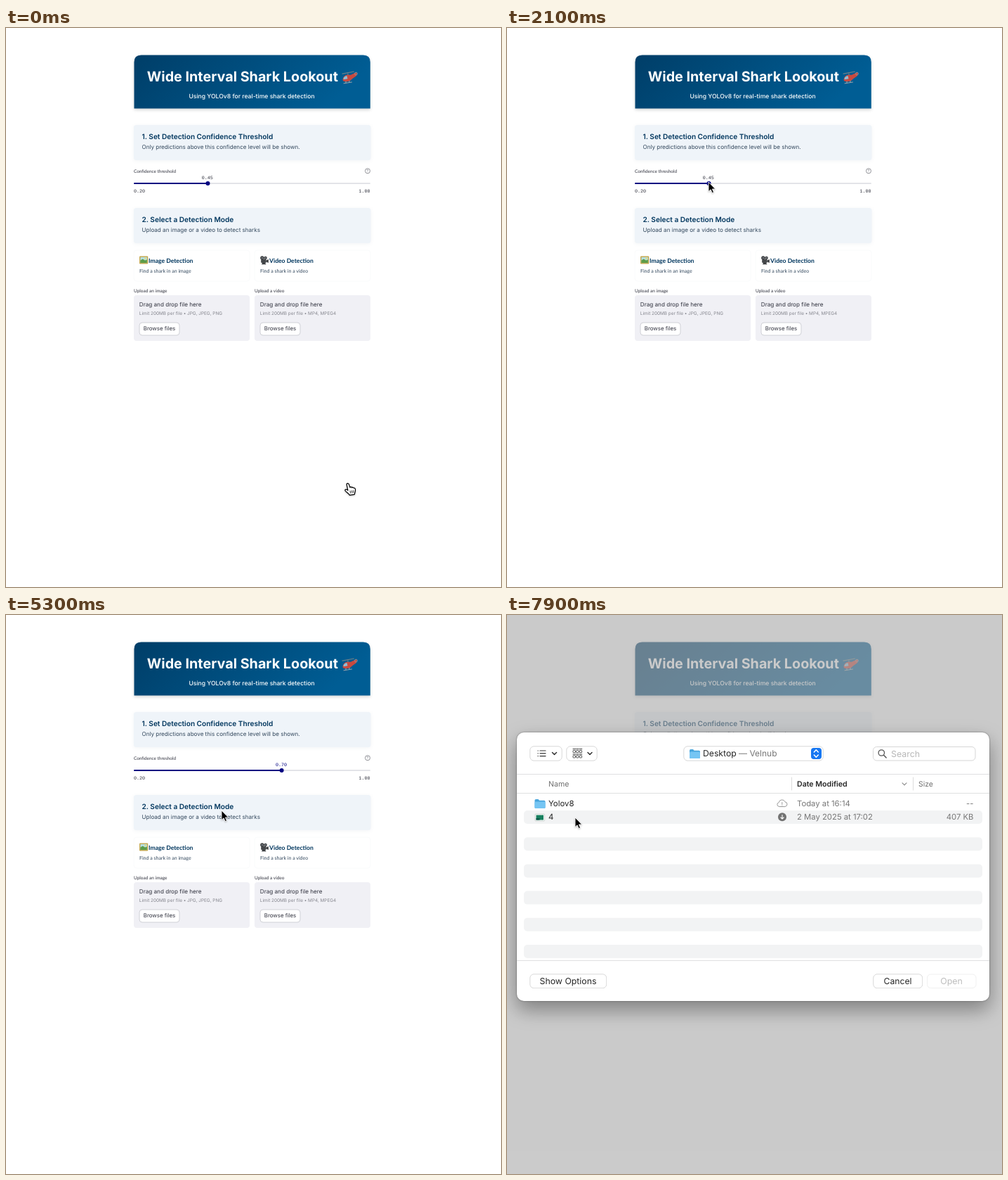
Animation, 705 px wide and 795 px high, one loop 8000 ms. Source, as an HTML page:

```html
<!DOCTYPE html>
<html lang="en">
<head>
<meta charset="utf-8">
<title>Shark detection demo</title>
<style>
html, body { margin: 0; width: 100%; height: 100%; overflow: hidden; background: #fff; }
svg { display: block; width: 705px; height: 795px; }
text { font-family: Inter, sans-serif; text-rendering: geometricPrecision; white-space: pre; }
.lato { font-family: Lato, sans-serif; }
.mono { font-family: "Liberation Mono", monospace; }
.header { filter: drop-shadow(0 2px 2px rgba(0,0,0,.16)); }
.card { filter: drop-shadow(0 1px 2.5px rgba(0,40,80,.05)); }
.panel { filter: drop-shadow(0 12px 14px rgba(0,0,0,.27)) drop-shadow(0 0 1px rgba(0,0,0,.45)); }
.key { filter: drop-shadow(0 .6px .6px rgba(0,0,0,.28)); }
.pointer { filter: drop-shadow(0 1px 1px rgba(0,0,0,.25)); }
</style>
</head>
<body>
<svg id="stage" viewBox="0 0 705 795" xmlns="http://www.w3.org/2000/svg">
  <defs>
    <linearGradient id="sea" x1="0" y1="0" x2="1" y2=".25">
      <stop offset="0" stop-color="#003e68"/><stop offset="1" stop-color="#005d94"/>
    </linearGradient>
    <g id="folder">
      <path d="M0 1.6Q0 0 1.6 0H5l1.6 1.7H13.4Q15 1.7 15 3.2V11.4Q15 13 13.4 13H1.6Q0 13 0 11.4Z" fill="#48a5dc"/>
      <rect y="3.4" width="15" height="9.6" rx="1.5" fill="#75c5f3"/>
    </g>
  </defs>
  <g id="page"></g>
  <g id="dialog"></g>
  <g id="pointer" class="pointer">
    <path id="arrow" d="M0 0V13.6L3.1 10.8 5.2 15.6 7.5 14.6 5.4 10H9.7Z" fill="#000" stroke="#fff" stroke-width=".9" stroke-linejoin="round"/>
    <g id="hand" fill="#fff" stroke="#000" stroke-width="1.2" stroke-linejoin="round" stroke-linecap="round">
      <path d="M-2.2 1.6C-2.8-.4 0-1.2.8.8L2.4 5.4C3 4.2 4.8 4.4 5.2 5.8 5.9 4.8 7.4 5.1 7.8 6.4 8.8 5.6 9.8 6.6 10 8 10.4 10.6 9.4 12 8.8 15.4L2 16.4C.8 14.4-1.6 13-4 10.6-5.6 8.8-3.6 7.4-2 8.6L-.6 9.6Z"/>
      <path d="M2.7 10.4l.5 3M5 10.1l.4 3M7.2 9.8l.2 3" stroke-width=".8"/>
    </g>
  </g>
</svg>
<script>
const $ = id => document.getElementById(id);

const text = (x, y, size, fill, str, attrs = '') =>
  `<text x="${x}" y="${y}" font-size="${size}" fill="${fill}" ${attrs}>${str}</text>`;
const rect = (x, y, w, h, r, fill, attrs = '') =>
  `<rect x="${x}" y="${y}" width="${w}" height="${h}" rx="${r}" fill="${fill}" ${attrs}/>`;
const line = (d, color, width = 1, attrs = '') =>
  `<path d="${d}" fill="none" stroke="${color}" stroke-width="${width}" stroke-linecap="round" stroke-linejoin="round" ${attrs}/>`;

const MID = 'text-anchor="middle"', END = 'text-anchor="end"';
const LATO = 'class="lato"', MONO = 'class="mono"';
const NAVY = '#000080', INK = '#31333f', TITLE = '#00365e';

const helicopter = `<g transform="translate(478 60)">
  <path d="M1.5 13Q2.5 7.5 8 6.5L13 6.8 20.5 3 22 4.2 21 8 14.5 12.8Q11 17 5.5 16.2 1 16 1.5 13Z" fill="#c9493e"/>
  <path d="M2.5 12Q3.5 8.6 7.5 8L8.5 12.2 3 13.2Z" fill="#8fbfd8"/>
  ${line('M1 5.2 17.5 2M9 3.7V6.5', '#6f8088', 1.2)}
  ${line('M3 18.8 14.5 17M6 16v2.2M11 15.4v2', '#98a5ad', 1)}
  <circle cx="20.5" cy="5" r="1.9" fill="none" stroke="#8d9aa3" stroke-width=".8"/>
</g>`;

const picture = `<g transform="translate(190 324)">
  ${rect(0, .5, 12.2, 11, 1, '#c3a548')}${rect(1.4, 1.9, 9.4, 8.2, 0, '#b5dfe4')}
  <path d="M1.4 10.1V6.4L4.6 4.4 8 6.6 10.8 5.4V10.1Z" fill="#5c9c48"/>
  <circle cx="8.4" cy="3.8" r="1.1" fill="#f7dc55"/>
</g>`;

const camera = `<g transform="translate(362 324)" fill="#3c3f42">
  <circle cx="2.8" cy="2.9" r="2.6"/><circle cx="7.5" cy="3" r="2.3"/>
  ${rect(1.2, 5, 7.4, 5, 1, '#45484b')}<path d="M8.4 6.6 11.8 5v5L8.4 8.6ZM3 10h4l1.6 2.2H2Z"/>
  <circle cx="2.8" cy="2.9" r="1" fill="#8d9296"/><circle cx="7.5" cy="3" r=".9" fill="#8d9296"/>
</g>`;

const section = (y, title, note) =>
  rect(182, y, 337.5, 50, 3.5, '#eff4f9', 'class="card"') +
  text(193.5, y + 20, 10.1, TITLE, title, 'font-weight="600"') +
  text(193.5, y + 34.3, 8.08, '#34495e', note);

const uploader = (x, icon, kind, note, label, limit, id) =>
  rect(x, 316, 165, 44, 4, '#fff', 'stroke="#fafbfc"') + icon +
  text(x + 21, 333.6, 8.6, TITLE, kind + ' Detection', LATO + ' font-weight="700"') +
  text(x + 8, 348, 7, '#34495e', note, LATO) +
  text(x, 375.6, 6.5, INK, label, LATO) +
  rect(x, 380, 165, 65, 4, '#f0f0f5') +
  text(x + 7.8, 395.8, 8.15, INK, 'Drag and drop file here') +
  text(x + 7.8, 408.2, 6.42, '#85868e', limit) +
  rect(x + 8, 419, 57, 18, 4, '#fff', `id="${id}" stroke="#d0d1d7"`) +
  text(x + 36.5, 430.2, 7.9, INK, 'Browse files', `${MID} id="${id}Text"`);

$('page').innerHTML =
  `<path class="header" d="M182.5 114.5V48.5Q182.5 38.5 192.5 38.5H508.8Q518.8 38.5 518.8 48.5V114.5Z" fill="url(#sea)"/>` +
  text(200.8, 75.6, 19.75, '#fff', 'Wide Interval Shark Lookout', 'font-weight="700"') + helicopter +
  text(350, 99.6, 8.6, '#fff', 'Using YOLOv8 for real-time shark detection', MID + ' font-weight="500"') +
  section(138, '1. Set Detection Confidence Threshold',
    'Only predictions above this confidence level will be shown.') +
  text(182, 205.6, 6.4, INK, 'Confidence threshold', LATO) +
  `<circle cx="515" cy="203.3" r="3.5" fill="none" stroke="#74757d" stroke-width=".8"/>` +
  text(515, 205.4, 5.4, '#74757d', '?', MID) +
  rect(182, 219.9, 337, 2, 1, '#e3e4e8') +
  rect(182, 219.9, 105, 2, 1, NAVY, 'id="fill"') +
  `<circle id="knob" cy="220.9" r="3" fill="${NAVY}"/>` +
  text(287, 215, 6.7, INK, '', `${MID} ${MONO} id="value"`) +
  text(182, 234, 6.7, INK, '0.20', MONO) +
  text(518.5, 234, 6.7, INK, '1.00', END + ' ' + MONO) +
  section(256, '2. Select a Detection Mode', 'Upload an image or a video to detect sharks') +
  uploader(182, picture, 'Image', 'Find a shark in an image', 'Upload an image',
    'Limit 200MB per file • JPG, JPEG, PNG', 'browse') +
  uploader(354, camera, 'Video', 'Find a shark in a video', 'Upload a video',
    'Limit 200MB per file • MP4, MPEG4', 'browseVideo');

const key = (x, y, w, h) => rect(x, y, w, h, 5, '#fff', 'class="key" stroke="#dedede" stroke-width=".7"');
const chevron = (x, y, color = '#333', w = 1.5) => line(`M${x - 3} ${y - 1.5}l3 3 3-3`, color, w);
const folder = (x, y) => `<use href="#folder" x="${x}" y="${y}"/>`;

let stripes = '';
for (let i = 0; i < 6; i++) stripes += rect(24, 278 + i * 38.2, 653, 19, 5, '#f2f3f4');

let bullets = '', cells = '';
for (let i = 0; i < 3; i++) {
  const y = 193 + i * 3.8;
  bullets += line(`M44 ${y}h.3M47 ${y}h8`, '#333', 1.2);
  cells += line(`M${94 + i * 4.6} 190.5h3.6`, '#444', 1) +
    rect(94 + i * 4.6, 192.5, 3.4, 3.2, .6, 'none', 'stroke="#444" stroke-width=".9"') +
    line(`M${94 + i * 4.6} 198h3.6`, '#444', 1) +
    rect(94 + i * 4.6, 199.8, 3.4, 3.2, .6, 'none', 'stroke="#444" stroke-width=".9"');
}

$('dialog').innerHTML =
  rect(0, 0, 705, 795, 0, '#aaa', 'fill-opacity=".615"') +
  rect(14, 167, 673, 382, 10, '#fff', 'class="panel"') +
  key(33, 187, 45, 20) + bullets + chevron(67.5, 197) +
  key(85, 187, 43, 20) + cells + chevron(118, 197) +
  key(252, 187, 198, 20) + folder(260, 191) +
  text(279, 201.3, 12.2, '#262626', 'Desktop') +
  text(330, 201.3, 12, '#777', '— Velnub') +
  rect(433, 189, 15, 16, 4, '#1777f2', 'id="stepBox"') +
  line('M437.3 195l3-3.3 3 3.3M437.3 199l3 3.3 3-3.3', '#333', 1.5, 'id="stepper"') +
  rect(521.5, 187.5, 145.5, 19.5, 5, '#fff', 'stroke="#d2d2d2" stroke-width=".9"') +
  `<circle cx="533.3" cy="196" r="4.2" fill="none" stroke="#555" stroke-width="1.3"/>` +
  line('M536.5 199.3l3.6 3.7', '#555', 1.5) +
  text(547, 201.6, 12.4, '#b8b8b8', 'Search') +
  line('M14.5 226.5H686.5M14.5 253.5H686.5M14.5 491.5H686.5', '#dfe0e1') +
  line('M405.5 231V249M578.5 231V249', '#dcdcdc') +
  text(59, 244, 10.6, '#6f6f6f', 'Name') +
  text(413, 244, 10.6, '#262626', 'Date Modified', 'font-weight="600"') +
  chevron(566, 240.3, '#888', 1.1) +
  text(586, 244, 10.4, '#6f6f6f', 'Size') +
  stripes + folder(39.5, 262) +
  text(59, 272.3, 11.4, '#222', 'Yolov8') +
  line('M387.5 272.5a3 3 0 0 1-.3-5.9 4.6 4.6 0 0 1 8.8-.8 3.4 3.4 0 0 1 .3 6.7ZM391.8 266.5v2.8M391.8 271v.1', '#999', 1) +
  text(413, 272.3, 11.3, '#777', 'Today at 16:14') +
  text(664.5, 272.3, 11.3, '#777', '--', END) +
  rect(40, 283, 13.5, 10, 1, '#fff', 'stroke="#bcc3c0" stroke-width=".7"') +
  rect(41.5, 284.5, 10.5, 7, 0, '#17805f') + rect(41.5, 289, 5, 2.5, 0, '#0c5848') +
  text(59, 291.4, 11.4, '#222', '4') +
  `<circle cx="392" cy="287.3" r="6" fill="#727272"/>` +
  line('M392 284.2v5.6M389.8 287.8l2.2 2.2 2.2-2.2', '#fff', 1.1) +
  text(413, 291.4, 11.3, '#777', '2 May 2025 at 17:02') +
  text(664.5, 291.4, 11.3, '#777', '407 KB', END) +
  key(33, 511, 108.5, 19.5) + text(87, 525, 12.3, '#262626', 'Show Options', MID) +
  key(522, 511, 69.5, 19.5) + text(556.5, 525, 12.2, '#262626', 'Cancel', MID) +
  rect(598.5, 511, 69.5, 19.5, 5, '#fff', 'stroke="#f0f0f0"') +
  text(633, 525, 12.4, '#bdbdbd', 'Open', MID);

// [time, x, y] of the pointer tip
const path = [
  [0, 487.5, 648], [900, 345, 340], [1300, 298, 196], [1700, 298, 196], [2000, 287, 216],
  [2200, 287, 222], [2300, 287, 222], [2900, 348, 222], [3300, 383, 222], [3600, 387, 222],
  [3900, 386, 222], [4100, 386, 222], [4500, 372, 258], [4800, 372, 258], [5300, 307, 278],
  [5400, 307, 278], [6200, 229, 426], [6400, 228, 428.5], [7100, 228, 428.5], [7800, 99, 291], [7900, 97, 288]
];
// [time, threshold]
const drag = [[2300, .45], [2900, .60], [3300, .68], [3600, .70]];

function sample(keys, t, ease = u => u) {
  if (t <= keys[0][0]) return keys[0].slice(1);
  for (let i = 1; i < keys.length; i++) {
    const [a, b] = [keys[i - 1], keys[i]];
    if (t <= b[0]) {
      const u = ease((t - a[0]) / (b[0] - a[0]));
      return a.slice(1).map((v, k) => v + (b[k + 1] - v) * u);
    }
  }
  return keys[keys.length - 1].slice(1);
}

const smooth = u => u * u * (3 - 2 * u);
const set = (id, attrs) => { for (const k in attrs) $(id).setAttribute(k, attrs[k]); };
const show = (id, on) => set(id, { display: on ? 'inline' : 'none' });

function draw(t) {
  const [x, y] = sample(path, t, smooth);
  set('pointer', { transform: `translate(${x} ${y})` });
  const hand = t < 200 || (t >= 6200 && t < 7100);
  show('hand', hand);
  show('arrow', !hand);

  const value = Math.round(sample(drag, t)[0] * 100) / 100;
  const kx = 182 + 336.5 * (value - .2) / .8;
  set('knob', { cx: kx + .3 });
  set('fill', { width: kx - 182 });
  set('value', { x: kx - .3, fill: t < 3600 ? INK : NAVY });
  $('value').textContent = value.toFixed(2);

  const hover = t >= 6200, focus = t >= 7000;
  set('browse', { stroke: focus ? '#0b0b2c' : hover ? NAVY : '#d0d1d7', 'stroke-width': focus ? 1.4 : 1 });
  set('browseText', { fill: hover ? '#101a5c' : INK });

  show('dialog', t >= 7100);
  const active = t >= 7300;
  show('stepBox', active);
  set('stepper', { stroke: active ? '#fff' : '#333' });
}

function tick() {
  draw(Math.floor(performance.now() % 8000 / 100) * 100);
  requestAnimationFrame(tick);
}
tick();
</script>
</body>
</html>
```
